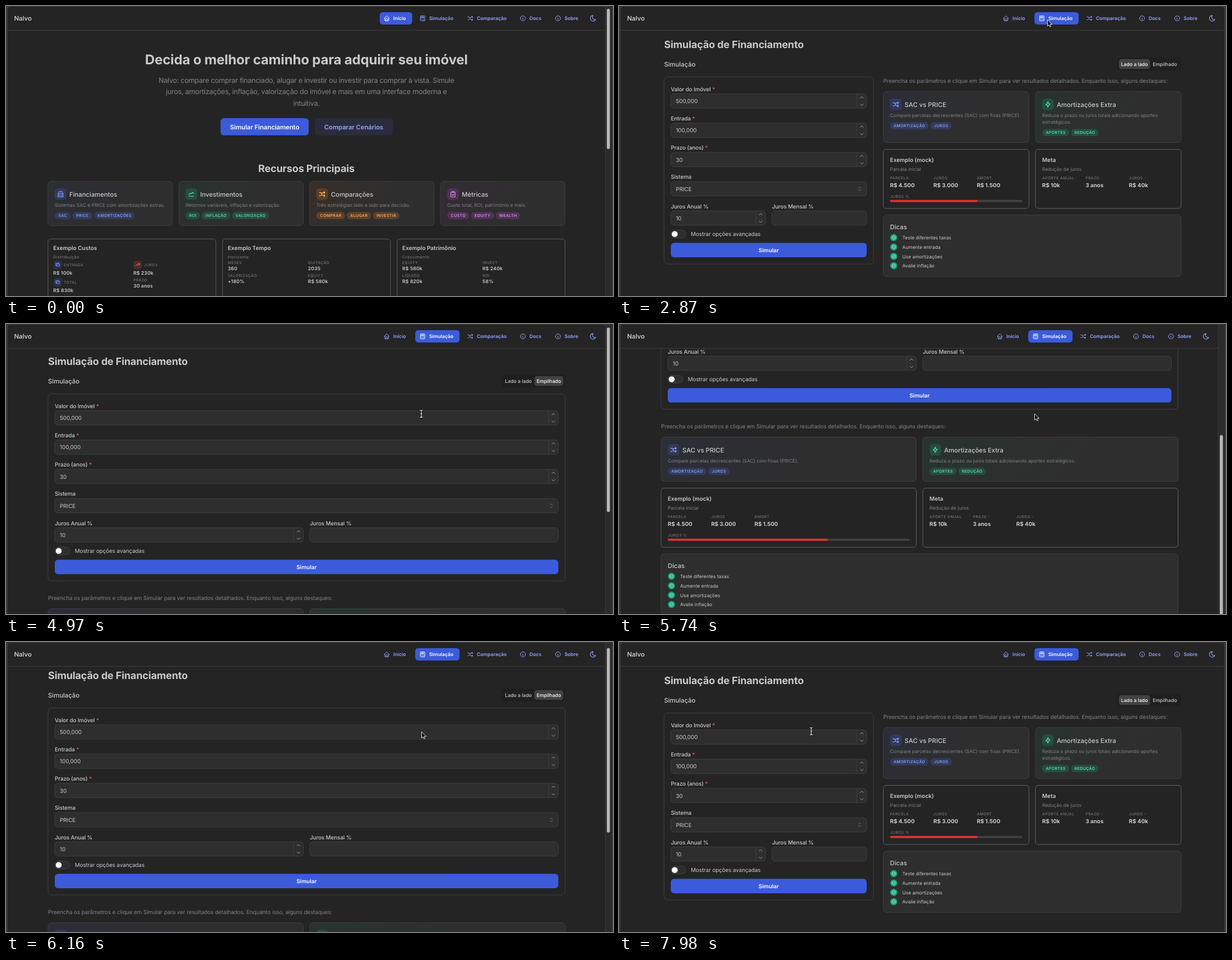
These frames come from a looping animation (1083x517 px, 8 s). An HTML page:

```html
<!DOCTYPE html>
<html lang="pt-BR">
<head>
<meta charset="utf-8">
<title>Simulador</title>
<style>
html, body { margin: 0; width: 100%; height: 100%; overflow: hidden; background: #3a3a3a; }
svg { display: block; width: 100%; height: 100%; }
text { font-family: Inter, "Open Sans", sans-serif; font-optical-sizing: none; text-rendering: geometricPrecision; white-space: pre; }
</style>
</head>
<body>
<svg id="stage" viewBox="0 0 1083 517" preserveAspectRatio="none"></svg>
<script>
const LOOP = 8000, STEP = 70;
const BG = '#242424', PANEL = '#2e2e2e', LINE = '#424242', TEXT = '#c9c9c9', DIM = '#828282';
const PRIMARY = '#3b5bdb', LINK = '#91a7ff';
const HUES = {
  blue: ['#91a7ff', '#4c6ef5'], green: ['#63e6be', '#12b886'], orange: ['#ffb870', '#fd7e14'],
  grape: ['#e599f7', '#be4bdb'], red: ['#ff8787', '#fa5252']
};
const ICONS = {
  home: 'M5 12H3l9-9 9 9h-2M5 12v7a2 2 0 0 0 2 2h10a2 2 0 0 0 2-2v-7M9 21v-6a2 2 0 0 1 2-2h2a2 2 0 0 1 2 2v6',
  calc: 'M6 3h12a2 2 0 0 1 2 2v14a2 2 0 0 1-2 2H6a2 2 0 0 1-2-2V5a2 2 0 0 1 2-2zM8 7h8v3H8zM8 14v.01M12 14v.01M16 14v.01M8 17v.01M12 17v.01M16 17v.01',
  shuffle: 'M18 4l3 3-3 3M18 20l3-3-3-3M3 7h3a5 5 0 0 1 5 5 5 5 0 0 0 5 5h5M21 7h-5a5 5 0 0 0-4 2m-3 6a5 5 0 0 1-3 2H3',
  info: 'M3 12a9 9 0 1 0 18 0a9 9 0 1 0-18 0M12 8h.01M11 12h1v4h1',
  moon: 'M12 3h.4a7.5 7.5 0 0 0 7.9 12.4A9 9 0 1 1 12 3z',
  bank: 'M3 21h18M3 10h18M5 6l7-3 7 3M4 10v11M20 10v11M8 14v3M12 14v3M16 14v3',
  chart: 'M4 19h16M4 15l4-6 4 2 4-5 4 4',
  clipboard: 'M9 5H7a2 2 0 0 0-2 2v12a2 2 0 0 0 2 2h10a2 2 0 0 0 2-2V7a2 2 0 0 0-2-2h-2M11 3h2a2 2 0 0 1 0 4h-2a2 2 0 0 1 0-4zM9 14l2 2 4-4',
  trend: 'M3 17l6-6 4 4 8-8M14 7h7v7',
  cash: 'M8 9h13v10H8zM17 9V5H3v10h5M14 14h.01',
  bolt: 'M13 3v7h6l-8 11v-7H5z',
  check: 'M3 12a9 9 0 1 0 18 0a9 9 0 1 0-18 0M8.5 12l2.5 2.5 4.5-5',
  up: 'M5 15l7-7 7 7', down: 'M5 9l7 7 7-7', updown: 'M7 9l5-5 5 5M7 15l5 5 5-5'
};

// y is the middle of the capital letters
function text(x, y, str, size, { fill = TEXT, weight = 400, gap = 0, anchor = 'start', id = '' } = {}) {
  return `<text x="${x}" y="${y + size * .364}" font-size="${size}" font-weight="${weight}" fill="${fill}"
    letter-spacing="${gap}" text-anchor="${anchor}" ${id && `id="${id}"`}>${str}</text>`;
}
function rect(x, y, w, h, r, fill, stroke = 'none', extra = '') {
  return `<rect x="${x}" y="${y}" width="${w}" height="${h}" rx="${r}" fill="${fill}" stroke="${stroke}" stroke-width=".9" ${extra}/>`;
}
function icon(name, cx, cy, size, color) {
  return `<path d="${ICONS[name]}" transform="translate(${cx - size / 2} ${cy - size / 2}) scale(${size / 24})" fill="none"
    stroke="${color}" stroke-width="2" stroke-linecap="round" stroke-linejoin="round"/>`;
}
const heading = (x, y, str, size, anchor) => text(x, y, str, size, { weight: 700, gap: -.007 * size, anchor });
const caption = (x, y, str) => text(x, y, str, 6.7, { fill: DIM, gap: .5 });

function tile(x, y, size, name, hue) {
  const [light, base] = HUES[hue];
  return rect(x, y, size, size, size * .25, base, 'none', 'fill-opacity=".2"')
    + icon(name, x + size / 2, y + size / 2, size * .64, light);
}
function badge(x, cy, w, label, hue) {
  const [light, base] = HUES[hue];
  return rect(x, cy - 6.4, w, 12.8, 6.4, base, 'none', 'fill-opacity=".22"')
    + text(x + w / 2 + .2, cy, label, 7, { fill: light, weight: 500, gap: .4, anchor: 'middle' });
}

// 45° tint that fades into the panel colour
let washes = 0;
function wash(x, y, w, h, hue) {
  const id = 'wash' + washes++, cx = x + w / 2, cy = y + h / 2, d = (w + h) / 4;
  return [id, `<linearGradient id="${id}" gradientUnits="userSpaceOnUse" x1="${cx - d}" y1="${cy - d}" x2="${cx + d}" y2="${cy + d}">
    <stop offset="0" stop-color="color-mix(in srgb, ${HUES[hue][1]} 7%, #292929)"/><stop offset=".6" stop-color="${PANEL}"/></linearGradient>`];
}
function featureCard(x, y, w, h, hue, name, title, lines, badges) {
  const extra = (lines.length - 1) * 12, [id, gradient] = wash(x, y, w, h, hue);
  let left = x + 12;
  return gradient + rect(x, y, w, h, 6, `url(#${id})`, LINE)
    + tile(x + 12, y + 12.5, 20.5, name, hue)
    + text(x + 38, y + 23.2, title, 11.3, { weight: 500 })
    + lines.map((s, i) => text(x + 12, y + 42.8 + i * 12, s, 8.5, { fill: DIM })).join('')
    + badges.map(([label, bw]) => {
      const b = badge(left, y + 61 + extra, bw, label, hue);
      left += bw + 3.4;
      return b;
    }).join('');
}

function header(active, shift) {
  const items = [['home', 'Início', 691, 666.7, 58], ['calc', 'Simulação', 755, 730.2, 79],
    ['shuffle', 'Comparação', 840], ['info', 'Docs', 934], ['info', 'Sobre', 996.5]];
  return rect(3, 1, 1077, 42, 5, BG) + `<path d="M3 43.3H${1069 + shift}" stroke="${LINE}" stroke-width=".9"/>`
    + text(14.5, 22, 'Nalvo', 11.3, { weight: 600 })
    + `<g transform="translate(${shift})">` + items.map(([name, label, x, left, w], i) => {
      const fill = i === active ? '#fff' : LINK;
      return (i === active ? rect(left, 11, w, 21.9, 5.5, PRIMARY) : '')
        + icon(name, x - 11.7, 22, 11.8, fill) + text(x, 22, label, 8.6, { fill, weight: 600 });
    }).join('') + icon('moon', 1047.5, 22, 13, LINK) + '</g>';
}
function scrollbar(height, id) {
  return rect(1069, 1, 12, 520, 0, '#2b2b2b') + '<path d="M1069.3 1V517" stroke="#3f3f3f" stroke-width=".9"/>'
    + rect(1072, 5, 5.5, height, 2.75, '#b8b8b8', 'none', `id="${id}"`);
}

function home() {
  const middle = { anchor: 'middle' };
  const hero = ['Nalvo: compare comprar financiado, alugar e investir ou investir para comprar à vista. Simule',
    'juros, amortizações, inflação, valorização do imóvel e mais em uma interface moderna e', 'intuitiva.'];
  const features = [
    ['blue', 'bank', 'Financiamentos', 'Sistemas SAC e PRICE com amortizações extras.', [['SAC', 28], ['PRICE', 35.5], ['AMORTIZAÇÕES', 72]]],
    ['green', 'chart', 'Investimentos', 'Retornos variáveis, inflação e valorização.', [['ROI', 25.5], ['INFLAÇÃO', 50.5], ['VALORIZAÇÃO', 66]]],
    ['orange', 'shuffle', 'Comparações', 'Três estratégias lado a lado para decisão.', [['COMPRAR', 51], ['ALUGAR', 43], ['INVESTIR', 47.5]]],
    ['grape', 'clipboard', 'Métricas', 'Custo total, ROI, patrimônio e mais.', [['CUSTO', 39], ['EQUITY', 41], ['WEALTH', 43]]]
  ];
  const stat = (x, y, label, value, dx = 0, drop = 10.5) => caption(x + dx, y, label)
    + text(x, y + drop, value, 8.6, { weight: 600, gap: .15 });
  const sample = (x, title, sub, body) => rect(x, 415.3, 299.5, 125, 5, BG, '#646464')
    + text(x + 9.3, 431.7, title, 10, { weight: 600 }) + text(x + 9.3, 447, sub, 7.2, { fill: DIM, gap: .5 }) + body;
  const grid = (x, cells) => cells.map(([label, value], i) =>
    stat(x + 9.3 + i % 2 * 143, i < 2 ? 457.2 : 480.6, label, value)).join('');
  return heading(536, 95, 'Decida o melhor caminho para adquirir seu imóvel', 24, 'middle')
    + hero.map((s, i) => text(536, 132 + i * 20.8, s, 12.65, { ...middle, fill: DIM, gap: -.3 })).join('')
    + rect(382.8, 200, 157.3, 30.6, 5.8, PRIMARY) + text(461.5, 215.5, 'Simular Financiamento', 11.3, { ...middle, fill: '#fff', weight: 600, gap: -.05 })
    + rect(551, 200, 139, 30.6, 5.8, '#2a2c3d') + text(620.5, 215.5, 'Comparar Cenários', 11.3, { ...middle, fill: LINK, weight: 600, gap: -.05 })
    + heading(536, 289.3, 'Recursos Principais', 18, 'middle')
    + features.map(([hue, name, title, desc, tags], i) => featureCard(75 + i * 233.4, 312.6, 222, 79, hue, name, title, [desc], tags)).join('')
    + sample(75, 'Exemplo Custos', 'Distribuição',
      tile(85, 454, 14.5, 'cash', 'blue') + stat(84.3, 461.3, 'ENTRADA', 'R$ 100k', 18.7, 14.3)
      + tile(227.5, 454, 14.5, 'trend', 'red') + stat(227.3, 461.3, 'JUROS', 'R$ 230k', 18.7, 14.3)
      + tile(85, 485, 14.5, 'cash', 'blue') + stat(84.3, 492.4, 'TOTAL', 'R$ 830k', 18.7, 14.3)
      + stat(227.3, 488.4, 'PRAZO', '30 anos'))
    + sample(386.4, 'Exemplo Tempo', 'Horizonte', grid(386.4, [['MESES', '360'], ['QUITAÇÃO', '2035'], ['VALORIZAÇÃO', '+180%'], ['EQUITY', 'R$ 580k']]))
    + sample(697.8, 'Exemplo Patrimônio', 'Crescimento', grid(697.8, [['EQUITY', 'R$ 580k'], ['INVEST.', 'R$ 240k'], ['LÍQUIDO', 'R$ 820k'], ['ROI', '58%']]));
}

function form(x, w) {
  const label = (lx, y, s) => text(lx, y, s, 9.9, { weight: 500, gap: -.1 });
  const box = (bx, y, bw, value = '') => rect(bx, y, bw, 25.5, 5.5, PANEL, LINE) + text(bx + 9, y + 12.8, value, 9.9, { gap: -.05 });
  const number = (bx, y, bw, value) => {
    const edge = bx + bw - 17.5;
    return box(bx, y, bw, value) + `<path d="M${edge} ${y}v25.5" stroke="${LINE}" stroke-width=".9"/>`
      + icon('up', edge + 8.8, y + 6.3, 9, TEXT) + icon('down', edge + 8.8, y + 19.2, 9, TEXT);
  };
  const left = x + 12, inner = w - 24, half = (inner - 11.5) / 2;
  const fields = [['Valor do Imóvel', '500,000'], ['Entrada', '100,000'], ['Prazo (anos)', '30']];
  return rect(x, 126.6, w, 333.4, 6, 'none', LINE)
    + fields.map(([name, value], i) => label(left, 148 + i * 52.2, `${name} <tspan fill="#fa5252">*</tspan>`)
      + number(left, 156.7 + i * 52.2, inner, value)).join('')
    + label(left, 304.6, 'Sistema') + box(left, 313.2, inner, 'PRICE')
    + icon('updown', left + inner - 12.5, 326, 10, DIM)
    + label(left, 356.9, 'Juros Anual %') + number(left, 365.3, half, '10')
    + label(left + half + 11.5, 356.9, 'Juros Mensal %') + box(left + half + 11.5, 365.3, half)
    + rect(left, 399.5, 27, 14, 7, PANEL, LINE) + `<circle cx="${left + 7}" cy="406.5" r="5.3" fill="#fff"/>`
    + text(left + 35.8, 406.6, 'Mostrar opções avançadas', 9.9, { gap: -.1 })
    + rect(left, 422.3, inner, 25.7, 5.8, PRIMARY)
    + text(left + inner / 2, 435.2, 'Simular', 9.9, { fill: '#fff', weight: 600, anchor: 'middle' });
}

function results(x, introY, w, wrap) {
  const cw = (w - 11.6) / 2, x2 = x + cw + 11.6, y = introY + 19.1;
  const ch = wrap ? 91 : 79, my = y + ch + 12, dy = my + 117;
  const about = wrap ? ['Reduza o prazo ou juros totais adicionando aportes', 'estratégicos.']
    : ['Reduza o prazo ou juros totais adicionando aportes estratégicos.'];
  const metric = (mx, title, sub, cells) => rect(mx, my, cw, 105.3, 5, BG, '#6a6a6a')
    + text(mx + 12, my + 19.2, title, 10, { weight: 600 }) + text(mx + 12, my + 35.5, sub, 8.5, { fill: DIM })
    + cells.map(([name, value], i) => caption(mx + 12 + i * 77.4, my + 51, name)
      + text(mx + 12 + i * 77.4, my + 64, value, 9.8, { weight: 700 })).join('');
  const tips = ['Teste diferentes taxas', 'Aumente entrada', 'Use amortizações', 'Avalie inflação'];
  return text(x, introY, 'Preencha os parâmetros e clique em Simular para ver resultados detalhados. Enquanto isso, alguns destaques:', 9.9, { fill: DIM, gap: -.1 })
    + featureCard(x, y, cw, ch, 'blue', 'shuffle', 'SAC vs PRICE', ['Compare parcelas decrescentes (SAC) com fixas (PRICE).'],
      [['AMORTIZAÇÃO', 68.7], ['JUROS', 38]])
    + featureCard(x2, y, cw, ch, 'green', 'bolt', 'Amortizações Extra', about, [['APORTES', 48], ['REDUÇÃO', 49]])
    + metric(x, 'Exemplo (mock)', 'Parcela inicial', [['PARCELA', 'R$ 4.500'], ['JUROS', 'R$ 3.000'], ['AMORT.', 'R$ 1.500']])
    + caption(x + 12, my + 83.6, 'JUROS %')
    + rect(x + 12, my + 90.2, cw - 24, 3.7, 1.8, LINE) + rect(x + 12, my + 90.2, (cw - 24) * .662, 3.7, 1.8, '#e03131')
    + metric(x2, 'Meta', 'Redução de juros', [['APORTE ANUAL', 'R$ 10k'], ['PRAZO -', '3 anos'], ['JUROS -', 'R$ 40k']])
    + rect(x, dy, w, 109.6, 6, PANEL, LINE) + text(x + 12, dy + 21, 'Dicas', 11.3, { weight: 500 })
    + tips.map((s, i) => {
      const ty = dy + 40.3 + i * 16.7;
      return `<circle cx="${x + 18.6}" cy="${ty}" r="6.3" fill="#12a67b"/>` + icon('check', x + 18.6, ty, 8.2, '#fff')
        + text(x + 34, ty + .3, s, 8.4);
    }).join('');
}

function simulation(x, stacked) {
  const name = stacked ? 'stacked' : 'side', right = x + 922.5;
  const option = (cx, s, id) => text(cx, 103.5, s, 8.7, { weight: 500, anchor: 'middle', id });
  return heading(x, 68.3, 'Simulação de Financiamento', 18) + text(x, 103.6, 'Simulação', 11.3, { weight: 500 })
    + rect(right - 113.5, 92, 113.5, 23, 5.5, '#1f1f1f') + rect(0, 94.8, 55, 17.4, 4.5, LINE, 'none', `id="${name}Pill"`)
    + option(right - 83.3, 'Lado a lado', name + 'Lado') + option(right - 29, 'Empilhado', name + 'Emp')
    + form(x, stacked ? 922.5 : 373.5)
    + (stacked ? results(x, 490.5, 922.5, false) : results(x + 391.2, 133.5, 531.3, true));
}

const stage = document.getElementById('stage');
const ibeam = 'M-2.5-6.5Q0-6.5 0-4.5Q0-6.5 2.5-6.5M0-4.5V4.5M-2.5 6.5Q0 6.5 0 4.5Q0 6.5 2.5 6.5M-1.6 0H1.6';
stage.innerHTML = rect(2.2, .5, 1078.6, 530, 6, BG, '#454545')
  + `<g id="home">${home()}${header(0, 0)}${scrollbar(250, 'homeThumb')}</g>`
  + `<g id="side">${simulation(80.4, false)}${header(1, 11)}</g>`
  + `<g id="stacked"><g id="scroller">${simulation(75, true)}</g>${header(1, 0)}${scrollbar(329, 'thumb')}</g>`
  + `<g id="cursor">
  <path id="arrow" d="M.5 0V11.2L3 8.9 4.8 12.6 6.6 11.8 4.9 8.2H8.5Z" fill="#000" stroke="#fff" stroke-width=".9"/>
  <path id="hand" d="M-1.2 5.2V.6a1.2 1.2 0 0 1 2.4 0V4q1.6-.8 2.2.4 1.4-.5 1.9.6 1.5-.2 1.5 1.2V8.5Q6.6 11 5.2 12.5H-.2Q-2 9.6-4 7.6-3.4 5.4-1.2 7.2Z" fill="#fff" stroke="#111" stroke-width=".8" stroke-linejoin="round"/>
  <g id="beam" fill="none"><path d="${ibeam}" stroke="#000" stroke-width="2.6"/><path d="${ibeam}" stroke="#fff" stroke-width="1.1"/></g></g>`;

const el = id => document.getElementById(id);
const show = (id, on) => el(id).setAttribute('display', on ? 'inline' : 'none');
const smooth = p => p * p * (3 - 2 * p);
const clamp = p => Math.min(1, Math.max(0, p));

function sample(track, t, ease) {
  const i = track.findIndex(key => key[0] > t);
  if (i === 0) return track[0].slice(1);
  if (i < 0) return track[track.length - 1].slice(1);
  const a = track[i - 1], b = track[i], p = ease((t - a[0]) / (b[0] - a[0]));
  return a.slice(1).map((v, k) => v + (b[k + 1] - v) * p);
}

const TO_SIM = 2450, TO_STACKED = 4400, TO_SIDE = 7210;
const path = [[840, 690, 362], [1820, 759.5, 23], [2800, 759.5, 23], [3640, 991.5, 104], [4340, 991.5, 104],
  [4900, 741, 160], [6500, 741, 160], [7000, 905, 102], [7270, 905, 102], [7950, 343, 159]];
const scroll = [[4900, 0], [4970, 2], [5110, 200], [5250, 310], [5670, 310], [5740, 308], [5950, 110], [6160, 9], [6370, 0]];
const shapes = [[0, 'arrow'], [3570, 'hand'], [4470, 'arrow'], [4830, 'beam'], [5040, 'arrow'], [6930, 'hand'], [7330, 'arrow'], [7840, 'beam']];

function placePill(name, right, p) {
  const pill = el(name + 'Pill');
  pill.setAttribute('x', right - 111 + 56.2 * p);
  pill.setAttribute('width', 55.5 - 4 * p);
  el(name + 'Lado').setAttribute('fill', p < .5 ? '#fff' : TEXT);
  el(name + 'Emp').setAttribute('fill', p >= .5 ? '#fff' : TEXT);
}

function draw(now) {
  const t = Math.floor((now % LOOP + 5) / STEP) * STEP;
  const stacked = t >= TO_STACKED && t < TO_SIDE;
  show('home', t < TO_SIM);
  show('stacked', stacked);
  show('side', t >= TO_SIM && !stacked);

  placePill('stacked', 997.5, smooth(clamp((t - TO_STACKED) / 200)));
  placePill('side', 1002.9, t < TO_SIDE ? 0 : 1 - smooth(clamp((t - TO_SIDE) / 200)));
  if (t > 3570 && t < TO_STACKED) el('sideEmp').setAttribute('fill', '#fff');

  const [top] = sample(scroll, t, p => p);
  el('scroller').setAttribute('transform', `translate(0 ${-top})`);
  el('thumb').setAttribute('y', 5 + top * .627);

  const [x, y] = sample(path, t, smooth);
  const shape = shapes.filter(([start]) => t >= start).pop()[1];
  show('cursor', t >= 840);
  el('cursor').setAttribute('transform', `translate(${x} ${y})`);
  ['arrow', 'hand', 'beam'].forEach(id => show(id, id === shape));
}

function tick() {
  draw(performance.now());
  requestAnimationFrame(tick);
}
tick();
</script>
</body>
</html>
```
